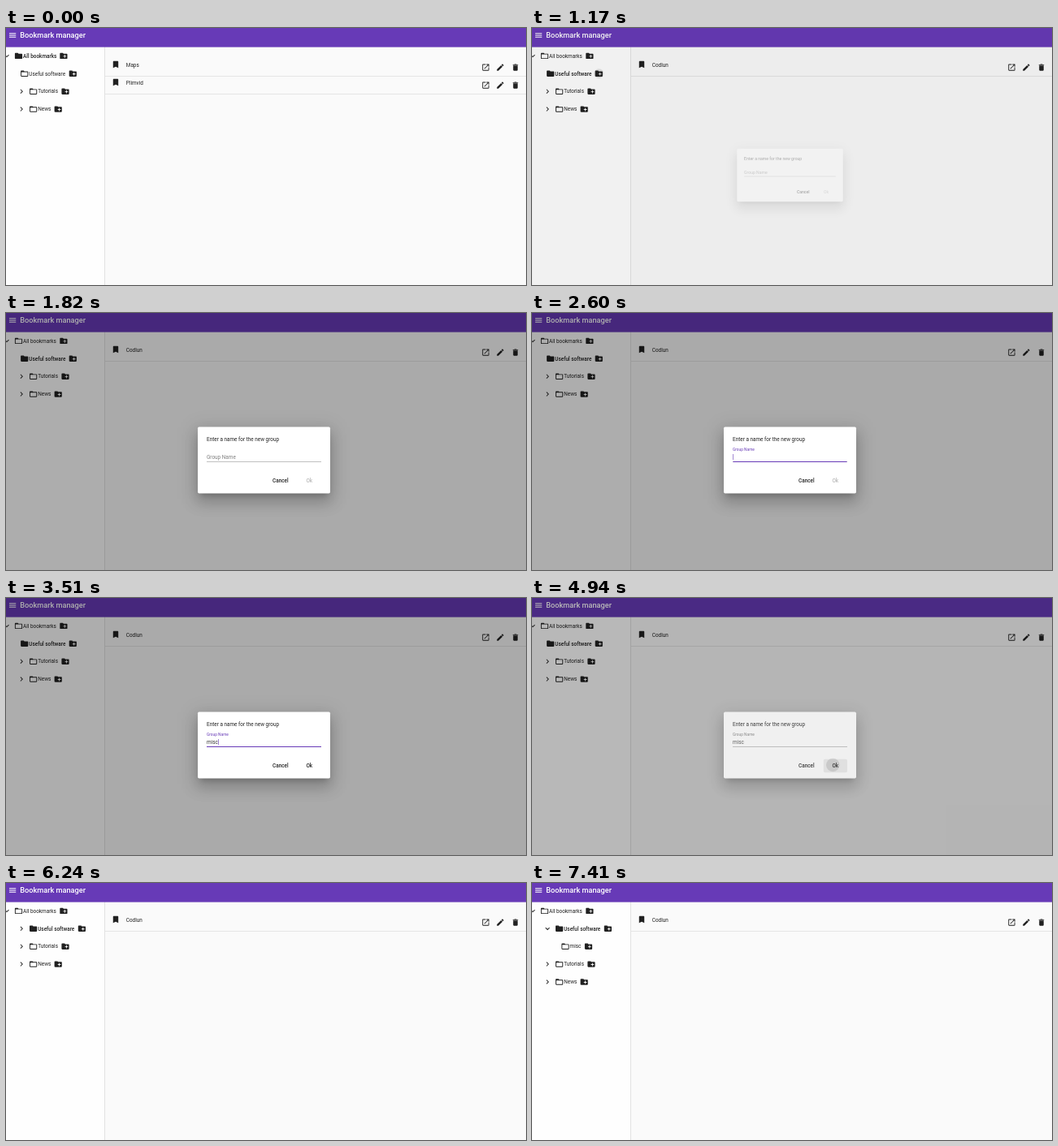
Write an HTML page that moves like this. It is 640 px wide and 317 px high and loops after 8000 ms.

```html
<!DOCTYPE html>
<html lang="en">
<head>
<meta charset="utf-8">
<title>Bookmark manager</title>
<style>
  html, body { margin: 0; width: 100%; height: 100%; overflow: hidden; background: #fafafa; }
  svg { display: block; width: 100%; height: 100%; }
  text { font: 400 6.4px Roboto, sans-serif; white-space: pre; }
  .medium { font-weight: 500; }
  .title { font-size: 9.2px; font-weight: 500; }
</style>
</head>
<body>
<svg id="stage" viewBox="0 0 640 317" xmlns="http://www.w3.org/2000/svg"></svg>
<script>
const stage = document.getElementById('stage');
const LOOP = 8000, STEP = 130;
const PURPLE = '#673ab7', INK = '#212121';

const ICONS = {
  menu: 'M3 18h18v-2H3v2zm0-5h18v-2H3v2zm0-7v2h18V6H3z',
  folder: 'M20 6h-8l-2-2H4c-1.1 0-2 .9-2 2v12c0 1.1.9 2 2 2h16c1.1 0 2-.9 2-2V8c0-1.1-.9-2-2-2zm0 12H4V8h16v10z',
  folderFull: 'M10 4H4c-1.1 0-2 .9-2 2v12c0 1.1.9 2 2 2h16c1.1 0 2-.9 2-2V8c0-1.1-.9-2-2-2h-8l-2-2z',
  addFolder: 'M20 6h-8l-2-2H4c-1.1 0-2 .9-2 2v12c0 1.1.9 2 2 2h16c1.1 0 2-.9 2-2V8c0-1.1-.9-2-2-2zm-1 8h-3v3h-2v-3h-3v-2h3V9h2v3h3v2z',
  bookmark: 'M17 3H7c-1.1 0-2 .9-2 2v16l7-3 7 3V5c0-1.1-.9-2-2-2z',
  open: 'M19 19H5V5h7V3H5c-1.1 0-2 .9-2 2v14c0 1.1.9 2 2 2h14c1.1 0 2-.9 2-2v-7h-2v7zM14 3v2h3.6l-9.8 9.8 1.4 1.4L19 6.4V10h2V3h-7z',
  edit: 'M3 17.25V21h3.75L17.8 9.95l-3.75-3.75L3 17.25zM20.7 7.05c.4-.4.4-1 0-1.4l-2.35-2.35c-.4-.4-1-.4-1.4 0l-1.85 1.85 3.75 3.75 1.85-1.85z',
  trash: 'M6 19c0 1.1.9 2 2 2h8c1.1 0 2-.9 2-2V7H6v12zM19 4h-3.5l-1-1h-5l-1 1H5v2h14V4z',
  right: 'M10 6L8.6 7.4 13.2 12l-4.6 4.6L10 18l6-6z',
  down: 'M16.6 8.6L12 13.2 7.4 8.6 6 10l6 6 6-6z'
};

const clamp = v => Math.max(0, Math.min(1, v));
const easeOut = p => 1 - (1 - p) ** 3;
const mix = (a, b, p) => a + (b - a) * p;
const black = a => `rgba(0,0,0,${a})`;

const rect = (x, y, w, h, fill, extra = '') =>
  `<rect x="${x}" y="${y}" width="${w}" height="${h}" fill="${fill}" ${extra}/>`;
const circle = (x, y, r, fill) => `<circle cx="${x}" cy="${y}" r="${r}" fill="${fill}"/>`;
const text = (x, y, str, fill = black(.87), cls = '', style = '') =>
  `<text x="${x}" y="${y}" fill="${fill}" class="${cls}" style="${style}">${str}</text>`;
const icon = (name, cx, cy, fill = INK) =>
  `<path d="${ICONS[name]}" fill="${fill}" transform="translate(${cx} ${cy}) scale(.46) translate(-12 -12)"/>`;

function treeRow(row, level, label, plusX, { arrow, selected } = {}) {
  const y = 34.4 + row * 21.9;
  return (arrow ? icon(arrow, level - 9.9, y) : '') +
    icon(selected ? 'folderFull' : 'folder', level + 4.6, y) +
    text(level + 10.2, y + 2.2, label, black(.87), selected ? 'medium' : '') +
    icon('addFolder', plusX, y);
}

function bookmark(i, name) {
  const y = 45 + i * 22;
  return icon('bookmark', 135, y) + text(147.8, y + 2.7, name) +
    icon('open', 590.4, y + 3.6) + icon('edit', 608.4, y + 3.6) + icon('trash', 627, y + 3.6) +
    rect(122, y + 14, 518, .7, black(.12));
}

function tree(t) {
  const closed = t >= 5070 && t < 6110;
  const nested = t >= 6110, expanded = t >= 6630;
  let out = treeRow(0, 10.9, 'All bookmarks', 70.9,
    { arrow: closed ? 'right' : 'down', selected: t < 1170 });
  if (closed) return out;
  const selected = t >= 1170;
  out += nested
    ? treeRow(1, 29, 'Useful software', 93.4, { arrow: expanded ? 'down' : 'right', selected })
    : treeRow(1, 18.1, 'Useful software', 82.3, { selected });
  if (expanded) out += treeRow(2, 36.4, 'misc', 69.5);
  const next = expanded ? 3 : 2;
  return out + treeRow(next, 29, 'Tutorials', 73, { arrow: 'right' }) +
    treeRow(next + 1, 29, 'News', 64.2, { arrow: 'right' });
}

function page(t) {
  const ripple = t === 1170 ? circle(82.3, 56.3, 6, black(.1)) : '';
  const list = t < 1170 ? bookmark(0, 'Maps') + bookmark(1, 'Plimvid') : bookmark(0, 'Codlun');
  return rect(0, 0, 640, 317, '#fafafa') + rect(0, 0, 121, 317, '#fefefe') +
    rect(121, 23, .8, 294, black(.12)) + rect(0, 0, 640, 23.6, PURPLE) +
    icon('menu', 8.1, 9, '#fff') + text(17.2, 12.2, 'Bookmark manager', '#fff', 'title') +
    ripple + tree(t) + list;
}

function backdropAlpha(t) {
  if (t < 1170 || t >= 5330) return 0;
  if (t >= 4940) return [.28, .06, .01][(t - 4940) / STEP];
  return [.05, .2, .29, .315][(t - 1170) / STEP] ?? .32;
}

function field(t) {
  const focused = t >= 2340 && t < 4940;
  const p = easeOut(clamp((t - 2275) / 400));
  const typed = t < 3250 ? '' : t < 3380 ? 'm' : t < 3510 ? 'mis' : 'misc';
  const caretOn = focused && (t < 2860 || t >= 3250 && t < 4030 || t >= 4550);
  const caretX = 247.3 + { 0: 0, 1: 5.6, 3: 10.5, 4: 13.9 }[typed.length];
  const half = focused ? 70.5 * p : 0;
  return text(247, mix(179.6, 170, p), 'Group Name', focused ? PURPLE : black(.5), '',
      `font-size:${mix(6.4, 4.8, p)}px`) +
    text(247, 179.6, typed, black(focused ? .8 : .7)) +
    (caretOn ? rect(caretX, 174, .6, 7.2, PURPLE) : '') +
    rect(247, 183.1, 141, .6, black(.42)) +
    rect(317.5 - half, 183, half * 2, 1, PURPLE);
}

function dialog(t) {
  if (t < 1170 || t >= 5070) return '';
  const opening = t === 1170, closing = t >= 4940;
  const scale = opening ? .8 : 1;
  const opacity = opening ? .32 : closing ? .8 : 1;
  const shadow = (dy, blur, spread, a) =>
    rect(236 - spread, 140.5 + dy - spread, 163 + spread * 2, 82 + spread * 2, black(a),
      `rx="2" style="filter:blur(${blur / 2}px)"`);
  return `<g opacity="${opacity}" transform="translate(317.5 181.5) scale(${scale}) translate(-317.5 -181.5)">` +
    shadow(5, 6.9, -3.2, .2) + shadow(11, 17.4, 1.4, .14) + shadow(4.1, 21, 3.7, .12) +
    rect(236, 140.5, 163, 82, '#fff', 'rx="1.8"') +
    text(247, 158, 'Enter a name for the new group') + field(t) +
    (t >= 4680 ? rect(358.8, 198.8, 29.2, 16.4, black(closing ? .08 : .04), 'rx="1.8"') : '') +
    (closing ? circle(370.3, 206, 8.3, black(.12)) : '') +
    text(328, 209.2, 'Cancel', black(.87), 'medium') +
    text(369.4, 209.2, 'Ok', black(t < 3250 ? .28 : .87), 'medium') + '</g>';
}

const start = performance.now();
let shown = -1;

function draw() {
  const t = Math.floor((performance.now() - start) % LOOP / STEP) * STEP;
  if (t !== shown) {
    shown = t;
    stage.innerHTML = page(t) + rect(0, 0, 640, 317, black(backdropAlpha(t))) + dialog(t);
  }
  requestAnimationFrame(draw);
}
draw();
</script>
</body>
</html>
```
